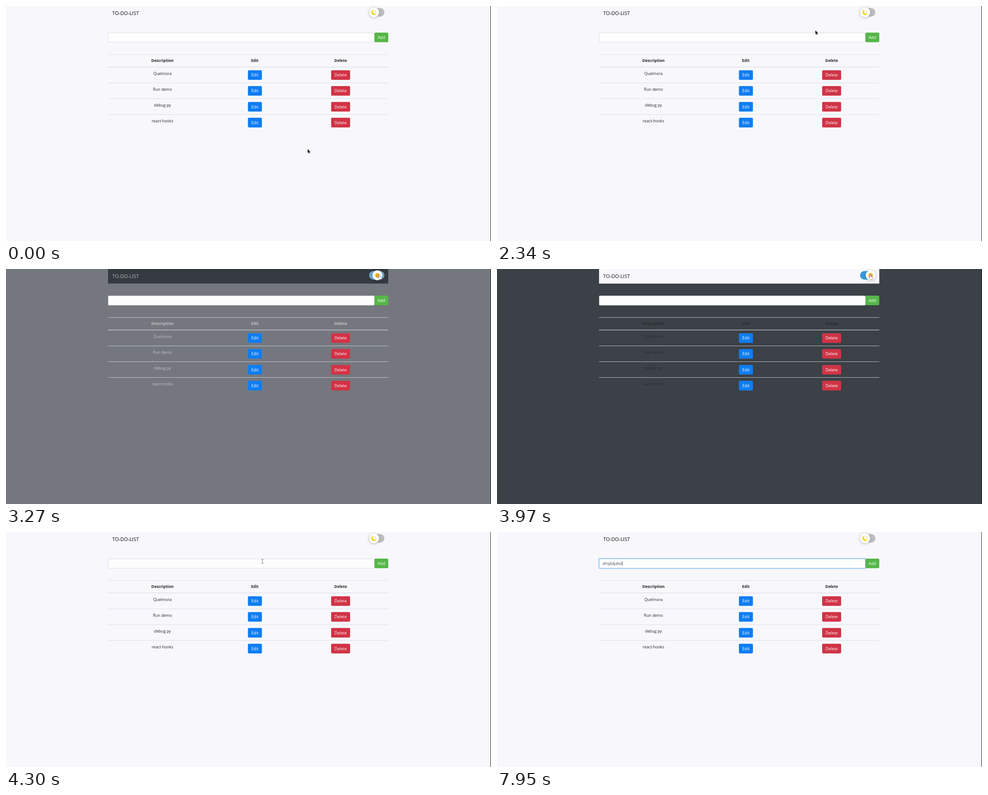
Recreate the animation shown at these times as an HTML page with a canvas. Size 1074 by 521 pixels, loop 8000 ms.

```html
<!DOCTYPE html>
<html lang="en">
<head>
<meta charset="utf-8">
<title>To-do list</title>
<style>
  html, body { margin: 0; width: 100%; height: 100%; overflow: hidden; }
  canvas { display: block; }
</style>
</head>
<body>
<canvas id="stage" width="1074" height="521"></canvas>
<script>
const LOOP = 8000;
const ctx = document.getElementById('stage').getContext('2d');
const LIGHT = [248, 248, 252], DARK = [52, 58, 64];
const LEFT = 226, WIDTH = 620.5;
const TASKS = ['Quelmora', 'Run demo', 'debug py', 'react-hooks'];
const TYPED = 'ahsjkdjabd';
const KEY_TIMES = [6820, 7000, 7200, 7260, 7320, 7390, 7450, 7600, 7690, 7770];

// Keyframes: [time, value, value, ...]
const PAGE_DARK = [[3130, 0], [3340, 1], [3963, 1], [4170, 0]];
const TEXT_LIGHT = [[3110, 0], [3140, .57], [3480, 1], [3930, 1], [3970, .04], [4050, 0]];
const SWITCH_ON = [[3110, 0], [3140, .15], [3400, 1], [3965, 1], [4200, 0]];
const FOCUS = [[5820, 0], [5970, 1]];
const POINTER = [
  [70, 668, 317], [450, 630, 240], [860, 515, 135], [1210, 444, 107], [1640, 470, 120],
  [1710, 470, 120], [2100, 610, 85], [2480, 760, 36], [2550, 760, 36], [2900, 827, 13],
  [3980, 827, 13], [4300, 568, 65], [4620, 535, 92], [5000, 535, 92], [5400, 610, 80],
  [5790, 655, 74], [6220, 667, 76]
];

function at(keys, t) {
  if (t <= keys[0][0]) return keys[0].slice(1);
  for (let i = 1; i < keys.length; i++) {
    const [a, b] = [keys[i - 1], keys[i]];
    if (t < b[0]) {
      const p = (t - a[0]) / (b[0] - a[0]);
      return a.slice(1).map((v, k) => v + (b[k + 1] - v) * p);
    }
  }
  return keys[keys.length - 1].slice(1);
}

const mix = (a, b, p) => `rgb(${a.map((v, i) => Math.round(v + (b[i] - v) * p))})`;

function box(x, y, w, h, radius, fill) {
  ctx.beginPath();
  ctx.roundRect(x, y, w, h, radius);
  ctx.fillStyle = fill;
  ctx.fill();
}

function disc(x, y, r, fill) {
  ctx.beginPath();
  ctx.arc(x, y, r, 0, 7);
  ctx.fillStyle = fill;
  ctx.fill();
}

function text(str, x, y, color, { size = 8.7, weight = 400, align = 'center' } = {}) {
  ctx.font = `${weight} ${size}px "Open Sans", "Noto Sans", sans-serif`;
  ctx.textAlign = align;
  ctx.fillStyle = color;
  ctx.fillText(str, x, y + size * .36);
}

function button(label, x, y, w, fill) {
  box(x, y, w, 21.3, 2.3, fill);
  text(label, x + w / 2, y + 10.7, '#fff', { size: 8.9 });
}

function drawSwitch(p) {
  box(804, 4.5, 34, 19, 9.5, mix([190, 190, 190], [52, 152, 224], p));
  const x = 815.2 + 12.6 * p;
  ctx.save();
  ctx.shadowColor = 'rgba(0,0,0,.25)';
  ctx.shadowBlur = 6;
  ctx.shadowOffsetY = 1;
  disc(x, 14, 11, '#fdfdfd');
  ctx.restore();
  if (p > .5) {
    disc(x, 14, 5.3, '#f5b82e');
    disc(x - 1.8, 13, .8, '#8a5a12');
    disc(x + 1.8, 13, .8, '#8a5a12');
    ctx.beginPath();
    ctx.arc(x, 14.5, 2.5, .3, 2.8);
    ctx.strokeStyle = '#8a5a12';
    ctx.lineWidth = .8;
    ctx.stroke();
  } else {
    disc(x - .2, 14, 6.3, '#f6da3c');
    disc(x + 2.5, 11.7, 4.9, '#fdfdfd');
    disc(x + 2.6, 11.8, 1.5, '#f6da3c');
  }
}

function drawInput(t) {
  const focus = at(FOCUS, t)[0];
  if (focus) box(LEFT - 1.6, 57.6, 593, 24.4, 3, `rgba(0,123,255,${.27 * focus})`);
  box(LEFT, 59, 590, 21.7, 2.3, mix([216, 219, 218], [138, 190, 248], focus));
  box(LEFT + .9, 59.9, 588.2, 19.9, 1.6, '#fdfdfe');
  button('Add', 816, 59, 30.5, '#55b748');

  const typed = TYPED.slice(0, KEY_TIMES.filter(k => k <= t).length);
  if (!typed) return;
  text(typed, 233.6, 70, '#495057', { size: 8.6, align: 'left' });
  ctx.fillRect(234 + ctx.measureText(typed).width, 65, .8, 10);
}

function drawTable(color) {
  const line = (y, h) => {
    ctx.fillStyle = '#d8dae4';
    ctx.fillRect(LEFT, y, WIDTH, h);
  };
  line(107, .8);
  line(134.7, 1.1);
  [['Description', 346.5], ['Edit', 551], ['Delete', 741]]
    .forEach(([label, x]) => text(label, x, 121.3, color, { size: 8.6, weight: 700 }));
  TASKS.forEach((task, i) => {
    const y = 142.4 + 35.15 * i;
    if (i) line(Math.round(y - 7.5), .8);
    text(task, 346.5, y + 7, color);
    button('Edit', 535.7, y, 31, '#0f7df2');
    button('Delete', 720, y, 42, '#d03446');
  });
}

function outline(path, x, y, fill, stroke) {
  ctx.save();
  ctx.translate(x, y);
  const shape = new Path2D(path);
  ctx.lineWidth = 1;
  ctx.lineJoin = 'round';
  ctx.strokeStyle = stroke;
  ctx.stroke(shape);
  ctx.fillStyle = fill;
  ctx.fill(shape);
  ctx.restore();
}

function drawPointer(t) {
  if (t >= KEY_TIMES[0]) return;
  const [x, y] = at(POINTER, t);
  if (x > 804 && x < 840 && y < 25) {
    outline('M-1 0Q0-1 1 0V4L4 5Q5 5 5 6V8L4 10H0L-3 6Q-3 4-1 6Z', x, y, '#fff', '#222');
  } else if (x > LEFT && x < 816 && y > 59 && y < 81) {
    ctx.strokeStyle = '#555';
    ctx.lineWidth = .8;
    ctx.stroke(new Path2D(`M${x - 2} ${y - 4.5}h4m-2 0v9m-2 0h4`));
  } else {
    outline('M0 0V9L2 7.2L3.4 10.3L4.8 9.6L3.4 6.7H6Z', x, y, '#111', '#fff');
  }
}

function draw(t) {
  const headerDark = t >= 3110 && t < 3940;
  const pale = at(TEXT_LIGHT, t)[0];
  ctx.fillStyle = mix(LIGHT, DARK, at(PAGE_DARK, t)[0]);
  ctx.fillRect(0, 0, 1074, 521);
  ctx.fillStyle = mix(LIGHT, DARK, +headerDark);
  ctx.fillRect(LEFT, 0, WIDTH, 32.3);
  text('TO-DO-LIST', 235.3, 16, mix([10, 10, 10], LIGHT, pale), { size: 11, align: 'left' });
  drawSwitch(at(SWITCH_ON, t)[0]);
  drawInput(t);
  drawTable(mix([33, 37, 41], LIGHT, pale));
  ctx.fillStyle = '#111';
  ctx.fillRect(1073, 0, 1, 521);
  drawPointer(t);
}

function tick() {
  draw(performance.now() % LOOP);
  requestAnimationFrame(tick);
}
tick();
</script>
</body>
</html>
```
